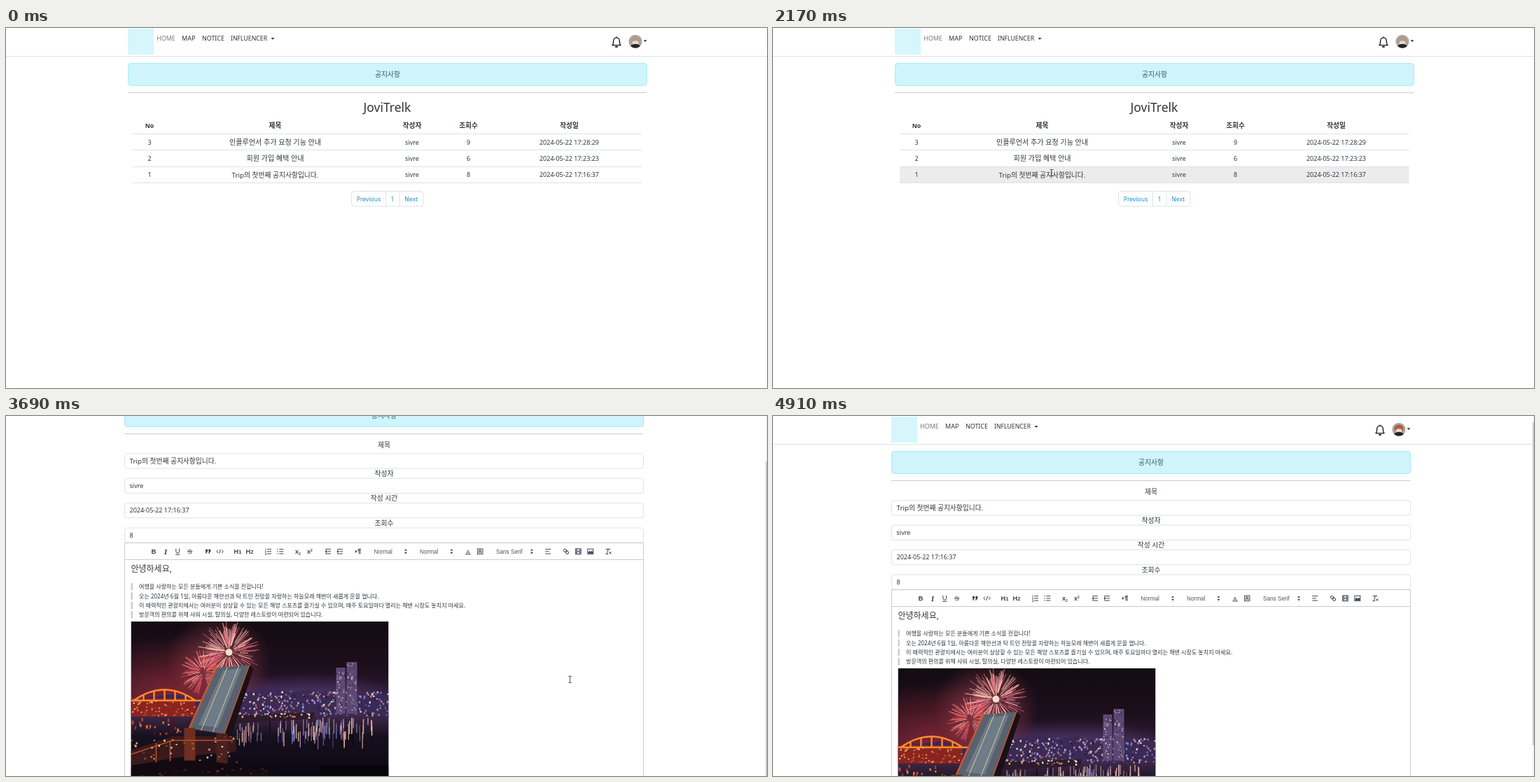
These frames come from a looping animation (1087 px wide and 515 px high, 5040 ms). An HTML page:

```html
<!DOCTYPE html>
<html lang="ko">
<head>
<meta charset="utf-8">
<title>공지사항</title>
<style>
html, body { margin: 0; width: 100%; height: 100%; overflow: hidden; background: #fff; }
svg { display: block; width: 100vw; height: 100vh; font-family: "Noto Sans", "Noto Sans CJK KR", "Noto Sans CJK JP", "Noto Sans CJK", sans-serif; }
.ui { font-family: "Liberation Sans", sans-serif; }
.serif { font-family: "Liberation Serif", serif; }
</style>
</head>
<body>
<svg id="stage" viewBox="0 0 1087 515"></svg>
<script>
const LOOP = 5040, INK = '#30353a', ICON = '#3c4551';
const stage = document.getElementById('stage');

let seed = 11;
const rnd = (a = 0, b = 1) => {
  seed = (seed * 16807) % 2147483647;
  return a + (b - a) * seed / 2147483647;
};
const pick = list => list[Math.floor(rnd(0, list.length))];
const many = (n, fn) => Array.from({ length: n }, (_, i) => fn(i)).join('');

// y is the optical middle of the line
const text = (x, y, str, size, attrs = '') =>
  `<text x="${x}" y="${(y + size * 0.36).toFixed(2)}" font-size="${size}" fill="${INK}" ${attrs}>${str}</text>`;
const mid = (x, y, str, size, attrs = '') => text(x, y, str, size, 'text-anchor="middle" ' + attrs);
const rect = (x, y, w, h, fill, attrs = '') =>
  `<rect x="${x}" y="${y}" width="${w}" height="${h}" fill="${fill}" ${attrs}/>`;
const path = (d, attrs = '') => `<path d="${d}" ${attrs}/>`;
const poly = (points, fill, attrs = '') => `<polygon points="${points}" fill="${fill}" ${attrs}/>`;
const line = (x1, y1, x2, y2, color, attrs = '') =>
  `<line x1="${x1}" y1="${y1}" x2="${x2}" y2="${y2}" stroke="${color}" ${attrs}/>`;
const at = (x, y, body) => `<g transform="translate(${x} ${y})">${body}</g>`;

const caret = (x, y) => path(`M${x} ${y}h5l-2.5 2.8z`, `fill="${INK}"`);

const bell = (x, y) => at(x, y,
  path('M-6 4.6C-4.6 3.4-4.4 .6-4.3-1.8A4.3 4.3 0 0 1 4.3-1.8C4.4 .6 4.6 3.4 6 4.6Z', 'fill="none" stroke="#111" stroke-width="1.35" stroke-linejoin="round"') +
  path('M-2.2 6h4.4a2.2 2 0 0 1-4.4 0zM-1-6.4a1 1.1 0 0 1 2 0z', 'fill="#111"'));

const avatar = (x, y, fur) => at(x, y,
  `<g clip-path="url(#round)">${rect(-10, -10, 20, 20, '#aaa6a1')}
  <ellipse cx="0" cy="-1" rx="6.5" ry="6" fill="${fur}"/>
  <ellipse cx="0" cy="2" rx="4.5" ry="3" fill="#e4dcd4"/>
  <ellipse cx="0" cy="9" rx="8" ry="5.5" fill="#262428"/></g>`);

// navigation, banner and rule shared by both pages
const header = (dx, fur) =>
  line(0, 40.5, 1087, 40.5, '#dcdfe2') +
  at(dx, 0,
    rect(174, 1, 37, 37, '#d6f6fb') +
    text(215, 15, 'HOME', 9, 'opacity=".65"') + text(251, 15, 'MAP', 9) +
    text(280, 15, 'NOTICE', 8.9) + text(321, 15, 'INFLUENCER', 8.7) +
    caret(378.5, 14) + bell(872, 20) + avatar(899, 19.3, fur) + caret(910.5, 17.3) +
    rect(174.5, 50.5, 741, 32, '#cff4fc', 'rx="4" stroke="#a9ebf8"') +
    mid(545, 66.5, '공지사항', 9.8, 'style="fill:#2c5f6c"') +
    line(174, 92.5, 915, 92.5, '#c9cacb'));

const ROW = 23.4, TOP = 151.8;
const cols = [205, 384.5, 580, 660.5, 804.5];
const rows = [
  ['3', '인플루언서 추가 요청 기능 안내', 'sivre', '9', '2024-05-22 17:28:29'],
  ['2', '회원 가입 혜택 안내', 'sivre', '6', '2024-05-22 17:23:23'],
  ['1', 'Trip의 첫번째 공지사항입니다.', 'sivre', '8', '2024-05-22 17:16:37']
];
const sizeOf = s => /^Trip/.test(s) ? 9.75 : /[가-힣]/.test(s) ? 10.1 : 9;

const listPage = () => header(0, '#b09a8a') +
  rect(181, TOP, 727.5, ROW, '#ececec', 'id="hover"') +
  mid(544.5, 114, 'JoviTrelk', 17.5) +
  ['No', '제목', '작성자', '조회수', '작성일'].map((s, i) =>
    mid(cols[i], 140, s, i ? 9.7 : 8.7, 'font-weight="700"')).join('') +
  rows.map((r, i) => r.map((s, c) => mid(cols[c], 163.3 + i * ROW, s, sizeOf(s))).join('')).join('') +
  many(4, i => line(181, Math.round(TOP + i * ROW) - 0.5, 908.5, Math.round(TOP + i * ROW) - 0.5, '#dee2e6')) +
  rect(493.5, 233.5, 102.5, 21.5, '#fff', 'rx="4" stroke="#dee2e6"') +
  line(542.5, 234, 542.5, 255, '#dee2e6') + line(562, 234, 562, 255, '#dee2e6') +
  [[518, 'Previous'], [552, '1'], [578.7, 'Next']].map(([x, s]) =>
    mid(x, 244.7, s, 8.65, 'style="fill:#1590cf"')).join('');

const bars = (x, widths, indent = 0) => path(widths.map((w, i) =>
  `M${x + (w < 7 ? indent : 0)} ${-3.2 + i * 3.2}h${w}`).join(''));
const picker = (x, label, arrow) => text(x, 0, label, 8.2, 'class="ui" stroke="none" style="fill:#555"') +
  path(`M${arrow - 2}-1l2-2.6 2 2.6zM${arrow - 2} 1l2 2.6 2-2.6z`, `fill="${ICON}" stroke="none"`);
const glyph = (x, s, size, attrs = '') =>
  mid(x, 0, s, size, `class="ui" stroke="none" style="fill:${ICON}" ${attrs}`);
const bold = 'font-weight="700"';

const toolbar = () => `<g transform="translate(0 260.8)" fill="none" stroke="${ICON}" stroke-width="1">` +
  glyph(211, 'B', 9.6, bold) +
  mid(228, 0, 'I', 10.5, 'class="serif" stroke="none" font-style="italic" font-weight="700"') +
  path('M242.8-4v4a2.4 2.4 0 0 0 4.8 0v-4M242 4.4h6.5') +
  glyph(262.6, 'S', 9.4) + path('M259 0h7.4') +
  path('M285-3h3v3l-2 3h-1.2l1-3H285zM289.3-3h3v3l-2 3H289l1-3h-.8z', `fill="${ICON}" stroke="none"`) +
  path('M303-2.4 300.9 0 303 2.4M308.2-2.4 310.3 0 308.2 2.4M306.5-3l-1.8 6') +
  glyph(331, 'H<tspan font-size="7.5">1</tspan>', 9.2, bold) +
  glyph(348, 'H<tspan font-size="7.5">2</tspan>', 9.2, bold) +
  bars(373, [6, 6, 6]) + path('M370.8-4.5v2.6M370-.8h1.6l-1.4 2.2h1.4M370 3h1.6v1.8h-1.6', 'stroke-width=".7"') +
  bars(390.3, [6, 6, 6]) + path('M387.2-3.2h1.5M387.2 0h1.5M387.2 3.2h1.5') +
  glyph(417, 'x<tspan font-size="5" dy="2">2</tspan>', 9, bold) +
  glyph(434, 'x<tspan font-size="5" dy="-3.4">2</tspan>', 9, bold) +
  bars(456, [8, 4.5, 8], 3.5) + path('M458-1.5 456 0l2 1.5z', `fill="${ICON}"`) +
  bars(473, [8, 4.5, 8], 3.5) + path('M473.4-1.5l2 1.5-2 1.5z', `fill="${ICON}"`) +
  path('M499-2.3l2.6 2.3-2.6 2.3z', `fill="${ICON}" stroke="none"`) +
  path('M504.3-3.4v7M506-3.4v7M507-3.4h-3a1.6 1.6 0 0 0 0 3') +
  picker(525.5, 'Normal', 571) + picker(591, 'Normal', 636.5) +
  glyph(660, 'A', 8) + path('M656.4 4h7.4') +
  rect(673.4, -3.9, 7.6, 7.8, '#c9ced5', 'stroke-width=".8"') + glyph(677.2, 'A', 7) +
  picker(700, 'Sans Serif', 751) +
  bars(770.3, [8, 5.4, 8]) +
  `<g transform="rotate(45 800 0)">${rect(795.8, -1.8, 4.6, 3.6, 'none', 'rx="1.7"')}${rect(799.6, -1.8, 4.6, 3.6, 'none', 'rx="1.7"')}</g>` +
  rect(813.6, -3.9, 7.6, 7.8, 'none') + path('M815.6-4v8M819.2-4v8M813.6-1.3h2M813.6 1.3h2M819.2-1.3h2M819.2 1.3h2M815.6 0h3.6') +
  rect(830.8, -3.6, 8, 7.2, 'none') + path('M831.5 3v-2l2-2 1.6 1.6 1.6-1.6 2 2v2z', `fill="${ICON}" stroke="none"`) +
  path('M856.6-3.4h6.6M860.2-3.4l-1.7 7M856.4 3.6h3.4M861.4.6l3 3M864.4.6l-3 3') + '</g>';

const burst = (x, y, n, r, colors) => many(n, () => {
  const a = rnd(0, Math.PI * 2), far = r * rnd(0.55, 1), near = far * rnd(0.15, 0.6);
  return line((x + near * Math.cos(a)).toFixed(1), (y + near * Math.sin(a)).toFixed(1),
    (x + far * Math.cos(a)).toFixed(1), (y + far * Math.sin(a)).toFixed(1),
    pick(colors), 'stroke-width=".9" opacity=".85"');
});
const specks = (n, x0, x1, y0, y1, colors, w, h) => many(n, () =>
  rect(rnd(x0, x1).toFixed(1), rnd(y0, y1).toFixed(1), w, rnd(h * 0.4, h).toFixed(1), pick(colors), `opacity="${rnd(0.4, 1).toFixed(2)}"`));
const haze = (x, y, rx, ry, id) => `<ellipse cx="${x}" cy="${y}" rx="${rx}" ry="${ry}" fill="url(#${id})"/>`;
const tower = (x, y, w) => rect(x, y, w, 132 - y, '#5c4a74') +
  specks(45, x, x + w - 2, y + 2, 128, ['#d0bfda', '#2c2140', '#f0d5cb'], 1.6, 2.4);

const photo = () => `<g clip-path="url(#frame)">` +
  rect(0, 0, 368, 250, 'url(#sky)') +
  haze(60, 110, 150, 90, 'red') + haze(125, 55, 75, 65, 'pink') + haze(250, 122, 170, 48, 'violet') +
  burst(104, 72, 90, 34, ['#f0506a', '#e8705e', '#ffb0ae']) +
  burst(140, 44, 130, 46, ['#ffc2ac', '#ef7480', '#fff0dc', '#e05a78']) +
  `<circle cx="140" cy="44" r="5" fill="#fff3dc" opacity=".9"/>` +
  poly('0,112 60,104 100,112 150,106 180,98 205,93 225,102 255,97 290,106 330,99 368,106 368,136 0,136', '#3a2a55') +
  specks(260, 150, 366, 99, 134, ['#ffd29a', '#b3a0ec', '#fff4f0', '#f08a80', '#7d97f0', '#241b38'], 2.4, 3.6) +
  tower(293, 66, 13) + tower(308, 58, 15) +
  rect(0, 110, 92, 28, '#8a2420') +
  path('M4 113Q48 82 92 113M0 113H100M18 113v-9M33 113V99M48 113V98M63 113V99M78 113v-9', 'fill="none" stroke="#ff8a2e" stroke-width="2.4"') +
  specks(60, 0, 98, 113, 134, ['#ffb050', '#e2502f', '#ffdca0'], 2.4, 3) +
  rect(0, 136, 368, 114, 'url(#water)') +
  specks(110, 150, 366, 137, 160, ['#b592d2', '#e8a59c', '#6a78c0', '#ffd6b4', '#0b0812'], 1.4, 24) +
  specks(45, 0, 85, 137, 160, ['#c24a30', '#f08a48', '#50151a'], 2.4, 6) +
  poly('150,134 262,130 262,139 150,146', '#2c1c2c') +
  specks(32, 150, 258, 130, 137, ['#ffd29a', '#fff6f0', '#f0875c'], 2.4, 3) +
  rect(270, 205, 98, 45, '#07050c') +
  poly('122,66 170,62 134,161 83,153', '#59616e') +
  poly('132,70 158,67 124,152 96,148', '#7d8c99', 'opacity=".6"') +
  path('M122 66 83 153M170 62 134 161', 'stroke="#d0572c" stroke-width="2.4"') +
  path('M138 65 100 156M154 64 117 158', 'stroke="#d8cc94" stroke-width="1"') +
  poly('134,161 170,62 175,68 141,170', '#1a1016') +
  poly('0,184 60,164 150,164 150,186 70,194 0,206', '#3a1a1c') +
  rect(76, 152, 16, 58, '#6e2f20') + rect(122, 160, 16, 54, '#4a2020') +
  path('M0 190 60 170H146M36 174v43M56 170v46', 'fill="none" stroke="#b0522e" stroke-width="1.6"') +
  specks(60, 0, 150, 164, 204, ['#f09a50', '#ffe0b0', '#a23a28', '#140b10'], 2.6, 3) +
  path('M0 208Q70 192 140 204T210 222V250H0Z', 'fill="#120a10"') +
  specks(70, 0, 195, 209, 246, ['#5c2c30', '#8f4a3a', '#2a1a24'], 3, 3) + '</g>';

const quote = [
  '여행을 사랑하는 모든 분들에게 기쁜 소식을 전합니다!',
  '오는 2024년 6월 1일, 아름다운 해안선과 탁 트인 전망을 자랑하는 하늘모래 해변이 새롭게 문을 엽니다.',
  '이 매력적인 관광지에서는 여러분이 상상할 수 있는 모든 해양 스포츠를 즐기실 수 있으며, 매주 토요일마다 열리는 해변 시장도 놓치지 마세요.',
  '방문객의 편의를 위해 샤워 시설, 탈의실, 다양한 레스토랑이 마련되어 있습니다.'
];
const fields = [['제목', rows[2][1]], ['작성자', 'sivre'], ['작성 시간', rows[2][4]], ['조회수', '8']];

const detailPage = () => header(-5, '#b8593d') +
  fields.map(([label, value], i) => {
    const y = 120.8 + i * 35.4;
    return rect(169.5, y, 741, 21.2, '#fff', 'rx="3.5" stroke="#dee2e6"') +
      mid(540, y - (i ? 7 : 12), label, 9.8) +
      text(176.5, y + 10.6, value, sizeOf(value));
  }).join('') +
  rect(169.5, 248.5, 741, 400, '#fff', 'stroke="#ccc"') + line(169.5, 272.5, 910.5, 272.5, '#ccc') +
  toolbar() + text(178.5, 285.5, '안녕하세요,', 12) +
  quote.map((s, i) => rect(178.5, 306 + i * 13.4, 2.4, 10.4, '#ccc') +
    text(190, 311.2 + i * 13.4, s, 8.06)).join('') +
  at(178.5, 361, photo());

const stops = list => list.map(([o, c, a = 1]) => `<stop offset="${o}" stop-color="${c}" stop-opacity="${a}"/>`).join('');
const vertical = (id, list) => `<linearGradient id="${id}" x2="0" y2="1">${stops(list)}</linearGradient>`;
const glow = (id, color, alpha) => `<radialGradient id="${id}">${stops([[0, color, alpha], [1, color, 0]])}</radialGradient>`;

stage.innerHTML = `<defs>
  <clipPath id="round"><circle r="9.5"/></clipPath>
  <clipPath id="frame"><rect width="368" height="245"/></clipPath>
  ${vertical('sky', [[0, '#140b12'], [0.25, '#1c0f1c'], [0.55, '#352040']])}
  ${vertical('water', [[0, '#3a2744'], [0.25, '#17101f'], [1, '#06040a']])}
  ${glow('red', '#a02a34', 0.75)}${glow('pink', '#e0606c', 0.5)}${glow('violet', '#7a5cb8', 0.7)}
</defs>
<g id="list">${listPage()}</g>
<g id="detail"><g id="page">${detailPage()}</g>
  ${rect(1085, 0, 2, 515, '#f3f3f3')}${rect(1085.3, 9, 1.7, 462, '#c1c1c1', 'id="thumb"')}</g>
<g id="cursor">
  ${path('M0 0V9.4L2.2 7.4 3.7 10.9 5.2 10.3 3.7 6.9H6.6Z', 'id="arrow" fill="#fff" stroke="#333" stroke-width=".8"')}
  ${path('M-2.4-4.5h4.8M0-4.5v9M-2.4 4.5h4.8', 'id="beam" fill="none" stroke="#444" stroke-width=".9"')}
</g>`;

// [time, x, y]
const moves = [[70, 1047, 508], [550, 1002, 452], [1100, 417, 266], [1240, 347, 219], [1380, 352, 172],
  [1500, 372, 163], [1830, 372, 163], [2170, 398, 207], [2500, 398, 207], [2920, 616.5, 326.5],
  [3410, 616.5, 326.5], [3820, 892.5, 400], [3960, 892.5, 400], [4380, 1064, 516]];
// [time, offset]
const scrolls = [[2950, 0], [2990, 4], [3060, 36], [3140, 65], [3210, 67],
  [3800, 67], [3890, 28], [3960, 5], [4030, 0]];

function track(keys, t) {
  if (t <= keys[0][0]) return keys[0].slice(1);
  const i = keys.findIndex(k => k[0] > t);
  if (i < 0) return keys[keys.length - 1].slice(1);
  const a = keys[i - 1], b = keys[i], p = (t - a[0]) / (b[0] - a[0]);
  return a.slice(1).map((v, n) => v + (b[n + 1] - v) * p);
}

const el = id => document.getElementById(id);
const show = (id, on) => el(id).setAttribute('display', on ? 'inline' : 'none');

function draw(t) {
  const onList = t < 2240;
  const [x, y] = track(moves, t), offset = Math.round(track(scrolls, t)[0]);
  const hovering = onList && t > 1240 && y < 218.5;
  const row = Math.max(0, Math.min(2, Math.floor((y - TOP) / ROW)));

  show('list', onList);
  show('detail', !onList);
  show('hover', hovering);
  el('hover').setAttribute('y', TOP + row * ROW);
  el('page').setAttribute('transform', `translate(0 ${-offset})`);
  el('thumb').setAttribute('y', 9 + offset * 0.84);

  const beam = hovering || (!onList && t < 3750);
  show('cursor', t >= 70 && t < 4380);
  show('arrow', !beam);
  show('beam', beam);
  el('cursor').setAttribute('transform', `translate(${x} ${y})`);
}

function tick() {
  draw(performance.now() % LOOP);
  requestAnimationFrame(tick);
}
tick();
</script>
</body>
</html>
```
